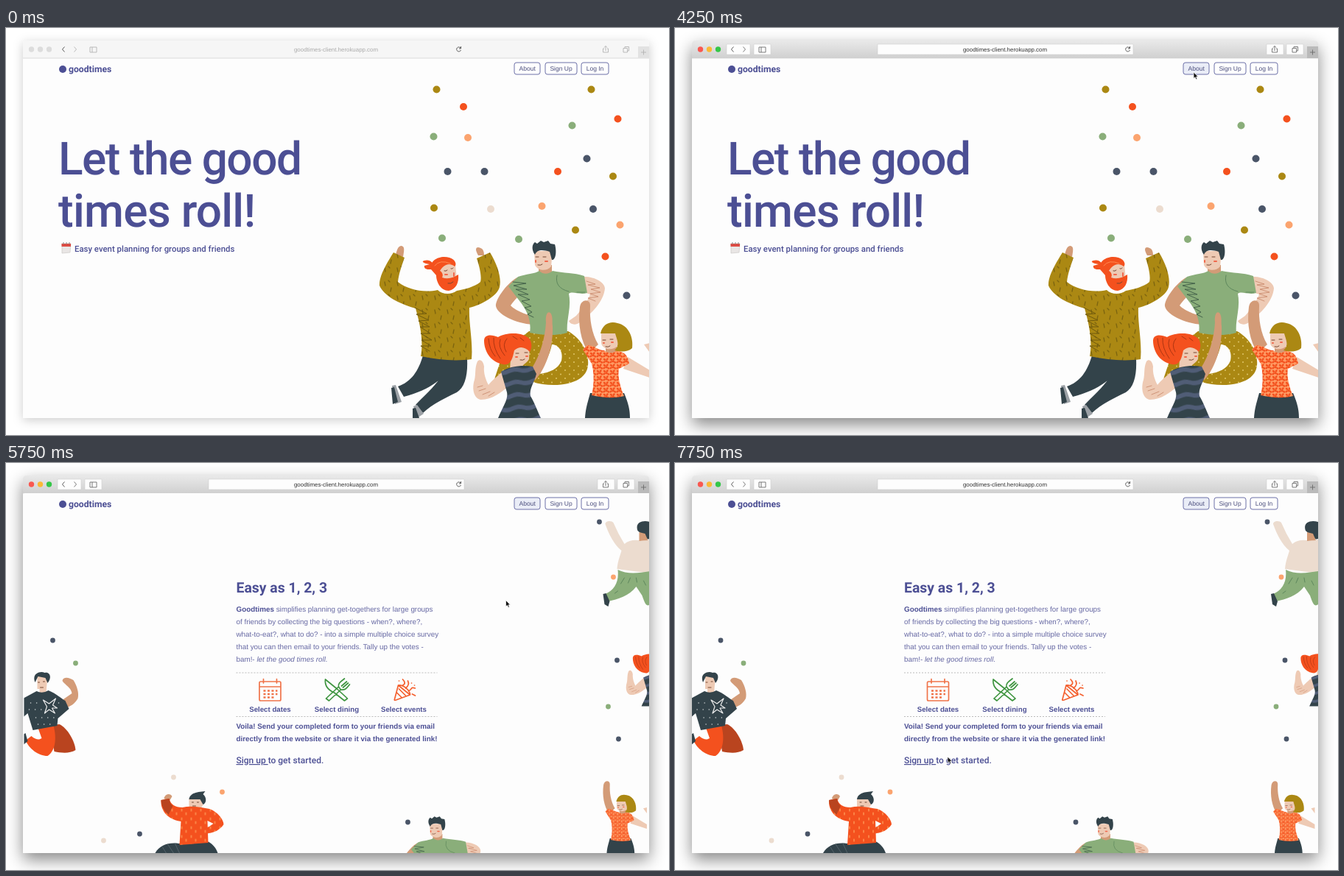
Animation of 900x553 px, one loop 8 s. Source, as an HTML page:

```html
<!DOCTYPE html>
<html lang="en">
<head>
<meta charset="utf-8">
<title>goodtimes</title>
<style>
html, body { margin: 0; width: 100%; height: 100%; overflow: hidden; background: #fff }
svg { display: block; width: 900px; height: 553px }
text { font: 9.85px "Liberation Sans", Arial, sans-serif; fill: #4c4f94; text-rendering: geometricPrecision; white-space: pre }
.display { font-family: Roboto, sans-serif; font-weight: 500 }
.headline { font-size: 62px; letter-spacing: -1.5px }
.headline tspan { letter-spacing: -.75px }
.bold { font-weight: 700 }
.label { font-size: 9.7px; font-weight: 700; text-anchor: middle }
.line { fill: none; stroke-linecap: round; stroke-linejoin: round }
.frame { fill: #fdfdfd; filter: drop-shadow(0 3px 7px #0003) }
.active .frame { filter: drop-shadow(0 9px 11px #0007) }
.bar { fill: #f6f6f6 }
.active .bar { fill: url(#metal) }
.field { fill: none }
.active .field { fill: #fdfdfd; stroke: #c9c9c9; stroke-width: .5 }
.tab { fill: #e2e2e2 }
.active .tab { fill: #bababa }
.light { fill: #dcdcdc }
.active .light { fill: var(--c) }
.icons { fill: none; stroke: #b4b4b4; stroke-width: .9 }
.active .icons { stroke: #6d6d6d }
.dark { fill: none; stroke: #5b5b5b }
.url { font-size: 7.9px; fill: #aaa; text-anchor: middle }
.active .url { fill: #333 }
.nav rect { fill: #fefefe; stroke: #6d70a8 }
.nav text { font-size: 8.5px; fill: #4a4d7d; text-anchor: middle }
.nav.focus #about-button { fill: #eaedf7 }
.orange { fill: #f4511e } .olive { fill: #ab8813 } .green { fill: #8aae7a } .navy { fill: #33434a }
.slate { fill: #4a5568 } .peach { fill: #fba46f } .cream { fill: #ecdccf } .tan { fill: #d39b77 } .pale { fill: #eecab4 }
.face { fill: none; stroke: #744631; stroke-linecap: round }
.blush { fill: none; stroke: #f1674b; stroke-width: 2; stroke-linecap: round }
</style>
</head>
<body>
<svg viewBox="0 0 900 553">
<defs>
  <linearGradient id="metal" x2="0" y2="1"><stop stop-color="#e9e9e9"/><stop offset="1" stop-color="#d0d0d0"/></linearGradient>
  <clipPath id="page"><rect x="23" y="41" width="850" height="489"/></clipPath>
  <pattern id="dash" width="17" height="19" patternUnits="userSpaceOnUse"><path d="M0 0H17V19H0Z" class="olive"/><path d="M4 3l1 5M13 11l-1 5M9 1l2 2" class="line" stroke="#7c640e" stroke-width="1.3"/></pattern>
  <pattern id="dots" width="12" height="11" patternUnits="userSpaceOnUse"><path d="M0 0H12V11H0Z" class="olive"/><circle cx="3" cy="3" r="1" fill="#dfc668"/><circle cx="9" cy="8.5" r="1" fill="#dfc668"/></pattern>
  <pattern id="spots" width="9" height="8" patternUnits="userSpaceOnUse"><path d="M0 0H9V8H0Z" fill="#ff9a63"/><path d="M2 2l1 .8M6.5 1.5l-.8 1.2M4.5 5h1M1.5 6.3l.8-.8M7.5 6l.4.6" class="line" stroke="#f4511e" stroke-width="2.4"/></pattern>
  <pattern id="stripes" width="30" height="17" patternUnits="userSpaceOnUse" patternTransform="rotate(-6)"><path d="M0 0H30V17H0Z" class="navy"/><path d="M0 5Q8 2 15 5T30 5V11Q22 14 15 11T0 11Z" fill="#505d76"/></pattern>
  <pattern id="knit" width="13" height="12" patternUnits="userSpaceOnUse"><path d="M0 0H13V12H0Z" class="orange"/><path d="M3 2v3M9 7v3" class="line" stroke="#ffa45f" stroke-width="1.2"/></pattern>

  <g id="bearded">
    <path class="tan" d="M529 308C531 301 532 296 537 296 542 297 540 304 539 311ZM641 309C637 302 637 298 641 298 647 299 649 302 649 309Z"/>
    <path class="navy" d="M566 445L606 450C600 475 575 492 540 501L532 487C550 481 560 466 566 445M588 449L626 450C627 472 623 488 612 495 596 503 580 510 566 523L556 512C570 497 586 484 592 470Z"/>
    <path fill="#9ca1a6" d="M524 486L529 485 537 508 528 511ZM553 514L558 512 567 524 558 530Z"/>
    <path class="navy" d="M523 489L527 488 532 508 525 511ZM552 517L556 516 561 530H552Z"/>
    <path fill="url(#dash)" d="M526 305C516 321 506 338 507 350 514 366 538 376 556 381 562 402 567 425 563 446 588 451 610 453 632 450 634 425 628 402 629 380 646 376 667 364 670 352 673 340 667 321 657 305L639 313C643 325 646 338 644 345 636 352 622 355 612 357 604 363 592 362 586 356 568 360 546 356 532 345 533 335 537 323 541 312Z"/>
    <path class="line" stroke="#705a0c" d="M555 380l16 8-14 1 17 8-14 1 15 8-13 0 14 9-13 0 15 9-14 0 13 8-14 0 12 7"/>
    <path class="pale" d="M588 321H610L612 343H588Z"/>
    <path class="orange" d="M577 328C574 315 590 308 602 312 611 315 612 322 609 324 601 318 594 322 589 330 592 331 594 336 592 339 600 342 608 339 614 335 615 346 611 355 601 357 590 357 584 345 584 336ZM581 327C570 330 567 326 568 323L575 321C567 320 563 317 568 316 575 314 581 318 581 327Z"/>
    <path class="line" stroke="#ff8b52" d="M582 323Q589 314 603 320"/>
    <path class="face" d="M595 330q2 1 4-1M604 327q2 1 3-1M600 347q4 1 7-2"/>
    <path class="blush" d="M596 335h3M608 333v4"/>
  </g>

  <g id="flexing">
    <path fill="url(#dots)" d="M710 412L763 412C785 424 795 450 788 466 779 486 740 489 715 481L661 483 676 438Z"/>
    <path fill="#fdfdfd" d="M741 430C750 430 757 440 754 452 750 463 738 468 725 470 730 458 738 445 741 430"/>
    <path class="tan" d="M694 339C682 345 664 368 665 378 668 392 700 404 722 403L726 393C712 392 692 385 685 377 690 370 698 362 702 356ZM723 322H741V336H723Z"/>
    <path class="pale" d="M785 338C800 338 813 346 813 354 811 372 795 388 780 399 774 405 766 403 764 398L774 391C782 382 790 370 793 362L785 359ZM717 303H742L740 324C733 332 721 329 718 322Z"/>
    <path class="green" d="M695 338C706 334 718 334 724 330 730 336 737 334 742 330 757 333 774 333 785 337L789 360C778 363 769 357 764 361 768 380 760 397 762 414 745 419 727 417 711 414 714 396 705 381 698 372L682 351Z"/>
    <path class="line" stroke="#44624a" d="M688 345l18 2-17 3 18 5-15 0 17 7-14 0 16 7-11 2 13 7-9 2 10 6-6 3 8 4"/>
    <path class="line" stroke="#5e875d" d="M748 336Q744 353 764 358M775 359h11"/>
    <path class="line" stroke="#c27b5c" stroke-width=".7" d="M788 344l12 4-10 1 16 4-12 2 13 4-14 2 11 4-14 2 10 4"/>
    <path class="navy" d="M718 308C713 301 714 294 718 291L721 293 726 289 730 291 736 289 739 293 745 294C748 304 746 316 741 315L738 304C728 301 721 301 718 308Z"/>
    <path class="face" d="M719 311h4M729 311h4M722 322q4 1 6-1"/>
    <path class="blush" d="M732 317h3M719 316v2"/>
  </g>

  <g id="redhead">
    <path class="tan" d="M714 462C725 445 732 420 733 400 732 390 735 384 739 387 743 392 741 400 742 405 743 430 735 460 718 479Z"/>
    <path class="pale" d="M674 467C664 475 656 483 655 485 651 478 648 468 649 460 648 452 643 449 640 453 636 462 638 470 636 478 632 490 635 504 645 505 660 505 672 495 682 487ZM686 432H711L710 450C706 457 700 456 700 464L684 465Z"/>
    <path fill="url(#stripes)" d="M672 467C685 459 702 458 715 460L720 470C717 482 710 490 712 500 718 510 722 522 726 530H668C674 515 682 505 680 495Z"/>
    <path class="orange" d="M649 425C649 416 659 416 668 420 680 413 703 413 711 423 715 430 713 437 711 440 704 433 697 432 690 438 688 447 686 459 675 457 657 454 649 438 649 425Z"/>
    <path class="line" stroke="#ad3512" d="M655 422q1 15 9 24M662 421q-1 14 9 28M671 423q-4 10 6 22M680 422q-7 8-1 18M688 419l6 4M698 421l5 4"/>
    <path class="line" stroke="#c27b5c" stroke-width=".7" d="M640 488l7-2M642 493l9-3M647 498l10-4M655 500l8-5"/>
    <path class="face" d="M692 442h4M704 441h4M698 451q4 1 6-1"/>
    <path class="blush" d="M692 447h2M706 446h2"/>
  </g>

  <g id="bob">
    <path class="tan" d="M779 379C776 402 780 425 791 442L804 430C795 415 792 395 793 378 794 368 781 367 779 379ZM814 428H829V446H814Z"/>
    <path class="pale" d="M844 447L874 465V475L838 463ZM866 430L874 428V441Z"/>
    <path class="navy" d="M793 496H839C846 512 847 522 847 530H786C787 515 790 508 793 496Z"/>
    <path fill="url(#spots)" d="M789 431C799 431 803 438 812 438 817 443 825 442 829 438 839 440 844 444 846 456L832 463C830 474 834 488 839 500 825 504 808 502 795 499 799 483 798 466 795 456L783 437Z"/>
    <path class="pale" d="M808 414H833L830 432C822 440 809 436 808 428Z"/>
    <path class="olive" d="M807 415C810 402 820 398 830 401 846 404 852 422 850 435 842 442 831 439 826 438 834 431 829 423 827 415Z"/>
    <path class="face" d="M810 424h4M820 423h4M814 433q4 1 6-1"/>
    <path class="blush" d="M811 428h1M822 427h2"/>
  </g>
</defs>

<g id="window">
  <path class="frame" d="M23 530V21Q23 17 27 17H869Q873 17 873 21V530Z"/>
  <path class="bar" d="M23 41V21Q23 17 27 17H869Q873 17 873 21V41Z"/>
  <path d="M23 41H873" stroke="#cfcfcf" stroke-width=".7"/>
  <circle class="light" cx="34.5" cy="29" r="3.7" style="--c:#f95850"/>
  <circle class="light" cx="46.5" cy="29" r="3.7" style="--c:#fbb936"/>
  <circle class="light" cx="58.5" cy="29" r="3.7" style="--c:#35c748"/>
  <path class="field" d="M70 22H102V36H70ZM107 22H130V36H107ZM275 22H622V36H275ZM803 22H826V36H803ZM830 22H853V36H830Z"/>
  <path class="tab" d="M858 25H873V41H858Z"/>
  <path class="icons" d="M92.5 25.5l3 3.5-3 3.5M114 26H123V33H114ZM117 26V33M812 28H810.5V33H817.5V28H816M814 31V24.5M812 26.5L814 24.5 816 26.5M838 27.5H843.5V33H838ZM840 27V25.5H845.5V31H844M862 33H869M865.5 29.5V36.5"/>
  <path class="dark" d="M79.5 25.5l-3 3.5 3 3.5M617 27A3 3 0 1 0 617.5 30M617.5 25V28H615"/>
  <text class="url" x="448" y="32">goodtimes-client.herokuapp.com</text>

  <g clip-path="url(#page)">
    <g id="home">
      <text class="display headline" x="71" y="199">Let the good<tspan x="71" y="270">times roll!</tspan></text>
      <path fill="#e9e6e5" stroke="#c7c3c2" stroke-width=".6" d="M76 293H88L87 305 76 306Z"/>
      <path fill="#dc4b43" d="M75.500 293H88V297H75.500Z"/>
      <path d="M78 291v3M82 291v3M86 291v3" stroke="#8d8585"/>
      <text class="display" style="font-size:11.4px" x="93" y="304">Easy event planning for groups and friends</text>
      <g id="confetti"></g>
      <use href="#flexing"/><use href="#bearded"/><use href="#redhead"/><use href="#bob"/>
    </g>

    <g id="about" clip-path="url(#page)">
      <path fill="#fdfdfd" d="M23 41H873V530H23Z"/>
      <g id="about-content">
        <text class="display" style="font-size:19.4px;font-weight:600" x="311" y="175.5">Easy as 1, 2, 3</text>
        <text y="201.5" fill-opacity=".85"><tspan x="311" class="bold" fill-opacity="1">Goodtimes</tspan> simplifies planning get-togethers for large groups<tspan x="311" dy="17">of friends by collecting the big questions - when?, where?,</tspan><tspan x="311" dy="17">what-to-eat?, what to do? - into a simple multiple choice survey</tspan><tspan x="311" dy="17">that you can then email to your friends. Tally up the votes -</tspan><tspan x="311" dy="17">bam!- <tspan font-style="italic">let the good times roll.</tspan></tspan></text>
        <path d="M311 285H584M311 344.5H584" stroke="#bbb" stroke-dasharray="2 2"/>
        <g class="line" stroke-width="1.7">
          <path stroke="#f0744a" d="M344 297H370Q371.5 297 371.5 299V321Q371.5 323 370 323H344Q342.5 323 342.5 321V299Q342.5 297 344 297ZM343 304H371M348 293.5V299M366 293.5V299"/>
          <path stroke="#f0744a" stroke-width="2.6" stroke-linecap="butt" stroke-dasharray="3 2.5" d="M348 309.5H367M348 314H367M348 318.5H362"/>
          <path stroke="#3f9540" d="M432 294C431 303 437 309 444 312L458 323 462 320 448 307ZM432 294L448 307M433 320L450 304 453 308 437 323ZM450 304C449 299 453 297 458 293M453 308C459 309 461 306 465 301M454 303L461 297M456 305L463 299"/>
          <path stroke="#f4602f" d="M531 302L526 321Q525 323 528 322L547 315ZM531 302C538 301 547 309 547 315M529 312L536 319M532 307L541 316M537 302C542 300 539 296 537 294M541 306C545 303 546 300 544 296M545 310C550 307 548 304 554 306M550 314l4 2M549 299l.1 0M532 296l.1 0M553 302l.1 0"/>
        </g>
        <text class="label" x="357" y="338">Select dates</text>
        <text class="label" x="447.5" y="338">Select dining</text>
        <text class="label" x="538.5" y="338">Select events</text>
        <text class="bold" x="311" y="361">Voila! Send your completed form to your friends via email<tspan x="311" dy="17">directly from the website or share it via the generated link!</tspan></text>
        <text class="display" style="font-size:12px" x="311" y="408"><tspan text-decoration="underline">Sign up </tspan>to get started.</text>
        <g id="sprinkles"></g>

        <g id="leaping">
          <path fill="#b9441f" d="M58 356L71 355C82 360 92 378 93 390 85 395 74 394 64 392Z"/>
          <path class="orange" d="M42 360L63 357C68 375 65 392 55 398 42 398 30 388 25 377L33 371C40 377 44 376 47 374Z"/>
          <path class="navy" d="M20 370L25 367 28 378 22 383Z"/>
          <path class="tan" d="M75 322L88 313C87 305 79 302 75 296 76 290 84 291 90 295 95 303 98 313 96 320 92 327 86 331 79 333Z"/>
          <path class="pale" d="M41 290H55L53 312H44V307H41Z"/>
          <path class="navy" d="M20 321L40 310Q48 314 56 309C67 313 73 320 79 323L84 334 69 347 68 357 35 363 28 340 20 347ZM38 298C33 286 45 282 51 285 57 283 62 290 55 299L52 292 42 290Z"/>
          <path class="line" stroke="#eee" stroke-width="1.2" d="M49 322L57 327 66 320 62 329 68 333 61 333 65 340 57 335 51 340 54 331Z"/>
          <path class="line" stroke="#cbd0d0" stroke-width="1.5" stroke-dasharray=".1 8" d="M32 326H48M70 326h6M30 335H48M39 346H66M42 355H64"/>
          <path class="face" d="M42 298h2M49 297h2M45 305h4"/>
        </g>

        <g id="stepping">
          <path class="navy" d="M233 517L272 514C280 518 284 524 286 530H201C207 519 220 515 233 517Z"/>
          <path class="line" stroke="#536168" d="M218 518l8 12M228 517l6 13M211 522l5 8"/>
          <path class="tan" d="M213 456C214 449 222 448 224 453L220 460ZM264 498L274 494 274 503 265 506Z"/>
          <path class="pale" d="M247 456H266V464C264 471 256 472 247 470Z"/>
          <path fill="url(#knit)" d="M209 458L220 456C222 464 228 468 238 468 250 465 262 468 275 470 286 474 294 485 294 491 290 498 280 503 273 503L270 497 280 490 272 486 273 516 234 519 236 487C222 485 208 476 209 458Z"/>
          <path fill="#b9441f" d="M209 458L220 456Q221 463 225 466L219 478Q209 469 209 458Z"/>
          <path class="navy" d="M247 457C248 448 258 447 269 446L266 450C272 455 270 463 266 464L262 457Z"/>
          <path class="face" d="M251 461h2M258 461h2M252 466h4"/>
        </g>

        <g id="running">
          <path class="cream" d="M812 83C812 78 821 78 823 81L830 96 838 110C845 104 854 104 862 106L873 104V150L828 144C829 132 833 124 834 119 824 111 817 97 812 83Z"/>
          <path class="green" d="M829 145C842 152 860 149 873 147V192C867 197 865 188 862 180L854 168C844 181 829 185 816 188L812 178C824 173 831 162 829 145Z"/>
          <path class="navy" d="M809 178L813 177 818 188 816 195 811 192ZM856 92C852 81 862 77 873 80V103C867 105 866 99 862 97Z"/>
          <path class="tan" d="M858 94L866 96 870 105 858 106Z"/>
          <path class="line" stroke="#5e875d" d="M838 156l-5 8M846 156l-3 7M854 156l1 6M864 160l3 6M829 174l-4 3"/>
        </g>
        <use href="#flexing" transform="translate(57.4 272.2) scale(.72)"/>
        <use href="#redhead" transform="translate(447 2) scale(.62)"/>
        <use href="#bob" transform="translate(326.6 202.6) scale(.62)"/>
      </g>
    </g>
  </g>

  <circle cx="77" cy="56" r="5" fill="#4c4f94"/>
  <text class="display" style="font-size:12.2px;font-weight:700" x="85" y="59.5">goodtimes</text>
  <g class="nav" id="nav">
    <rect id="about-button" x="690" y="47" width="35" height="16" rx="3"/><text x="707.7" y="58.2">About</text>
    <rect x="732" y="47" width="43" height="16" rx="3"/><text x="753.5" y="58.2">Sign Up</text>
    <rect x="781" y="47" width="37" height="16" rx="3"/><text x="799.5" y="58.2">Log In</text>
  </g>
</g>
<path id="cursor" d="M0 0V8.5L2 6.8 3.3 9.8 4.8 9.2 3.5 6.3H6Z" fill="#111" stroke="#fff" stroke-width=".7"/>
</svg>
<script>
const LOOP = 8000, STEP = 250, PAGE_WIDTH = 850;
const el = id => document.getElementById(id);

function scatter(id, r, groups) {
  el(id).innerHTML = Object.entries(groups).map(([colour, points]) =>
    points.map(([x, y]) => `<circle class="${colour}" cx="${x}" cy="${y}" r="${r}"/>`).join('')).join('');
}
scatter('confetti', 5, {
  olive: [[584.5, 83.5], [794.5, 83.5], [581, 244.5], [824, 201.5], [773, 274.5]],
  orange: [[621, 107], [830.5, 123.5], [749, 195], [813.5, 310.5]],
  green: [[580.5, 147.5], [768.5, 132.5], [592, 285.5], [696, 287]],
  peach: [[627, 149], [727.5, 242], [833.5, 267.5]],
  slate: [[599.5, 195], [649.5, 195], [788.5, 177.5], [797, 246], [842.5, 363.5]],
  cream: [[658, 246]]
});
scatter('sprinkles', 3.4, {
  slate: [[62, 241], [180, 504], [544, 488], [804, 80], [828, 268], [830, 375]],
  green: [[93, 272], [816, 331]],
  peach: [[292, 447], [823, 155]],
  cream: [[226, 427], [131, 513]]
});

// time, x, y
const cursorPath = [[1750, 708, 61], [2250, 704, 60], [5250, 704, 60], [6250, 653, 313],
  [6750, 653, 313], [7500, 441, 392], [7750, 370, 399]];

function cursorAt(t) {
  const next = cursorPath.findIndex(key => key[0] > t);
  if (next < 0) return cursorPath.at(-1).slice(1);
  const [t0, x0, y0] = cursorPath[Math.max(next - 1, 0)], [t1, x1, y1] = cursorPath[next];
  const k = t1 > t0 ? (t - t0) / (t1 - t0) : 0;
  return [x0 + (x1 - x0) * k, y0 + (y1 - y0) * k];
}

function draw(now) {
  const t = Math.floor(now % LOOP / STEP) * STEP;
  const remaining = t > 4250 ? Math.exp((4250 - t) / 236) : 1;
  const progress = 1 - remaining;

  el('window').classList.toggle('active', t >= 3500);
  el('nav').classList.toggle('focus', t >= 4000);
  el('home').setAttribute('transform', `translate(${-657 * progress})`);
  el('home').setAttribute('opacity', remaining);
  el('about').setAttribute('transform', `translate(${PAGE_WIDTH * remaining})`);
  el('about-content').setAttribute('opacity', progress);
  el('cursor').setAttribute('transform', `translate(${cursorAt(t)})`);
  el('cursor').setAttribute('visibility', t < cursorPath[0][0] ? 'hidden' : 'visible');
  requestAnimationFrame(draw);
}
requestAnimationFrame(draw);
</script>
</body>
</html>
```
